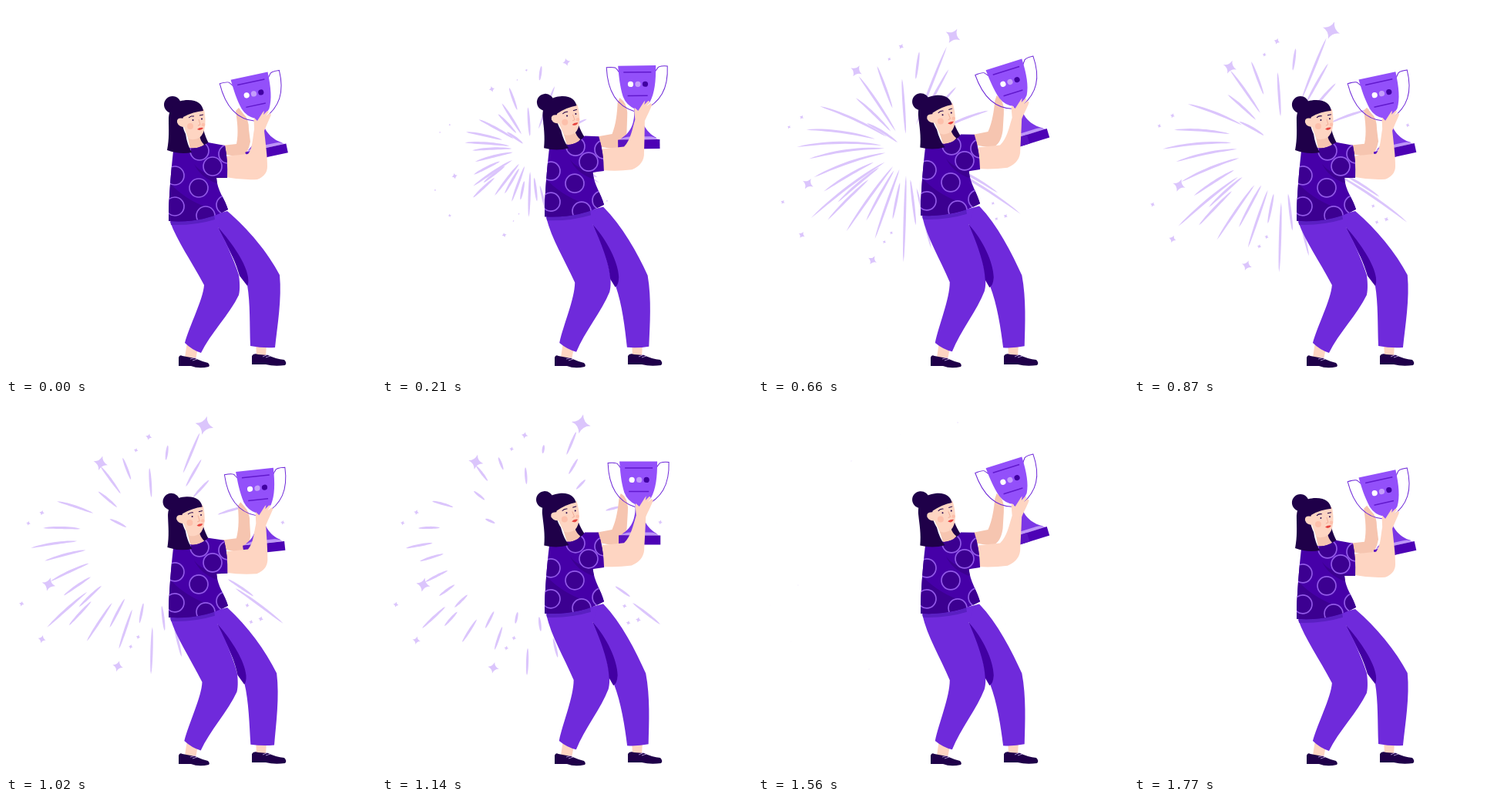
An HTML page with a canvas that plays this animation: 480x480 px, repeating every 1800 ms.

```html
<!DOCTYPE html>
<html>
<head>
<meta charset="utf-8">
<style>
html, body { margin: 0; width: 100%; height: 100%; overflow: hidden; background: #fff; }
canvas { display: block; width: 100vmin; height: 100vmin; }
</style>
</head>
<body>
<canvas width="480" height="480"></canvas>
<script>
const ctx = document.querySelector('canvas').getContext('2d');
const LOOP = 1800, BOUNCE = 900, BURST = [193, 187];
const HAIR = '#1f0049', SKIN = '#fed5c2', SKIN_FAR = '#f6c5b0', SHIRT = '#4600a8',
  SHADE = '#3c0091', PANTS = '#6f2adb', RING = '#9259e8', CUP = '#9350fa', SPARK = '#dbc5fc';

const lerp = (a, b, k) => a + (b - a) * k;
const clamp = x => Math.max(0, Math.min(1, x));
const smooth = x => { x = clamp(x); return x * x * (3 - 2 * x); };

// Each body part: colour, crouched outline, raised outline
const parts = {
  farArm: [SKIN_FAR,
    'M280,181 L299,179 C302,165 300,150 298,136 L302,132 L308,140 Q315,146 315,160 L317,176 Q314,192 306,196 Q295,195 282,192Z',
    'M275,156 L298,150 C306,138 311,125 315,112 L316,103 L319,103 Q324,112 322,124 L318,150 Q316,168 304,173 Q292,173 280,170Z'],
  nearArm: [SKIN,
    'M284,195 L314,192 C320,185 320,170 322,160 C322,152 321,146 322,145 L326,149 L333,138 L335,136 L334,141 L339,136 L341,137 L337,143 L342,139 L344,141 C340,150 337,157 335,162 C337,180 339,195 339,208 Q339,220 326,225 Q305,226 285,222Z',
    'M286,174 L314,171 C326,160 330,148 336,132 C335,124 334,118 335,116 L340,120 L347,109 L349,106 L348,112 L353,107 L355,108 L351,114 L356,110 L358,112 C355,122 350,128 348,134 C345,155 342,165 341,176 Q338,190 322,197 Q305,201 287,202Z'],
  rightLeg: [PANTS,
    'M240,278 L287,266 C315,290 340,320 355,349 C358,380 352,415 349,443 Q333,444 317,441 C316,415 317,385 313,362 C305,345 285,310 275,287Z',
    'M240,266 L287,254 C308,280 320,320 332,350 C340,380 342,412 343,440 Q332,444 319,445 C314,420 305,390 291,364 C290,345 280,310 272,280Z'],
  leftLeg: [PANTS,
    'M213,280 C222,305 240,330 257,362 C256,380 238,415 232,437 Q241,446 253,450 C265,425 290,400 302,375 C304,368 303,355 302,349 C298,335 287,310 275,287 L280,270Z',
    'M213,267 C218,300 232,325 242,355 C243,380 231,415 228,437 Q239,445 251,447 C260,420 280,390 287,366 C289,360 289,354 289,349 C290,335 284,310 272,280 L280,258Z'],
  innerLeg: ['#4200a3',
    'M275,287 C294,308 312,335 314,352 Q315,360 313,363 L303,350 C299,335 290,315 275,287Z',
    'M272,280 C290,300 300,330 299,352 Q297,365 290,367 L288,360 C290,340 285,315 272,280Z'],
  waist: ['#5a1fc2',
    'M213,277 Q255,280 270,270 L271,277 Q245,285 214,284Z',
    'M213,264 Q255,268 270,258 L271,264 Q245,272 214,271Z'],
  shirt: [SHIRT,
    'M238,184 C246,186 256,182 262,177 L284,181 Q288,200 287,223 L273,223 C274,240 284,250 288,264 Q255,282 211,279 C211,250 214,215 217,188Z',
    'M238,174 C247,176 260,168 264,158 L278,155 Q287,178 289,203 L274,207 C276,222 284,235 288,250 Q255,268 211,266 C211,240 214,205 217,180Z']
};

// Firework trails: end point and the share of the ray that stays empty
const trails = [
  [186, 82, 0], [210, 53, .6], [252, 36, 0], [254, 71, .1], [264, 98, .2],
  [151, 69, .3], [122, 80, 0], [119, 113, .1], [65, 126, 0], [134, 149, 0],
  [47, 161, .1], [31, 187, 0], [49, 204, 0], [56, 231, 0], [52, 291, 0],
  [74, 249, .2], [94, 264, .2], [81, 288, .3], [104, 309, 0], [134, 291, .1],
  [146, 319, 0], [188, 352, 0], [173, 285, .3], [228, 329, .2], [206, 295, .2],
  [361, 286, 0], [322, 250, .3], [310, 133, .2]
];
// Stars: resting place and radius
const stars = [
  [259, 24, 13], [121, 74, 10], [52, 235, 9.5], [144, 344, 7.5], [43, 308, 5.5],
  [185, 39, 4.5], [168, 57, 3], [25, 154, 3], [43, 140, 3.5], [16, 261, 3.5],
  [161, 318, 3], [171, 305, 3], [316, 263, 3], [321, 285, 3], [334, 281, 3.5], [363, 153, 3]
];
const rings = [[219, 220], [250, 236], [268, 208], [219, 260], [259, 272], [251, 188], [285, 258], [288, 192]];

function fill(path, color) {
  ctx.fillStyle = color;
  ctx.fill(new Path2D(path));
}
function stroke(path, color, width = 1) {
  ctx.strokeStyle = color;
  ctx.lineWidth = width;
  ctx.stroke(new Path2D(path));
}
function dot(x, y, r, color) {
  ctx.fillStyle = color;
  ctx.beginPath();
  ctx.arc(x, y, r, 0, 7);
  ctx.fill();
}
function place(x, y, degrees, draw) {
  ctx.save();
  ctx.translate(x, y);
  ctx.rotate(degrees * Math.PI / 180);
  draw();
  ctx.restore();
}
function blend([, low, high], k) {
  const goal = high.match(/[\d.]+/g);
  let i = 0;
  return low.replace(/[\d.]+/g, n => lerp(+n, +goal[i++], k).toFixed(2));
}

function drawTrail([x, y, start], from, to) {
  const dx = x - BURST[0], dy = y - BURST[1], len = Math.hypot(dx, dy);
  const bow = Math.abs(dx) * .24, steps = 14, left = [], right = [];
  from = lerp(start, 1, from);
  to = lerp(start, 1, to);
  if (to <= from) return;
  for (let i = 0; i <= steps; i++) {
    const s = lerp(from, to, i / steps);
    const px = BURST[0] + dx * s, py = BURST[1] + dy * s - bow * s * (1 - s);
    const w = 1.6 * Math.sqrt(Math.sin(Math.PI * i / steps) + 1e-6);
    left.push([px - dy / len * w, py + dx / len * w]);
    right.unshift([px + dy / len * w, py - dx / len * w]);
  }
  fill('M' + left.concat(right).join('L') + 'Z', SPARK);
}

function drawFirework(t) {
  const launch = .67 * Math.exp(-t / 90);
  const left = Math.max(0, 1400 - t) / 1000;
  const reach = 1 - .166 * left * left - launch;
  const head = 1 - .5 * (Math.max(0, 1150 - t) / 1000) ** 2 - launch / 2;
  const tail = .17 + .83 * smooth((t - 560) / 870);
  if (t > 0) for (const trail of trails) drawTrail(trail, tail, head);

  const size = clamp(1 - 2 * (1 - reach)) * (1 - smooth((t - 1350) / 250));
  if (size <= 0) return;
  for (const [x, y, r] of stars) {
    place(lerp(BURST[0], x, reach), lerp(BURST[1], y, reach), 10 + 220 * (1 - reach), () => {
      ctx.scale(r * size, r * size);
      fill('M0,-1 Q.18,-.18 1,0 Q.18,.18 0,1 Q-.18,.18 -1,0 Q-.18,-.18 0,-1Z', SPARK);
    });
  }
}

function drawTrophy() {
  ctx.translate(-333, -98);
  stroke('M309,82 Q307,79 306,78 Q305,75 293,76 C294,105 305,126 328,133', '#6d27d8');
  stroke('M356,82 Q358,79 359,78 Q360,74 372,75 C373,105 362,122 340,132', '#6d27d8');
  fill('M328,126 L337,126 C335,145 342,160 357,168 L311,168 C325,160 330,145 328,126Z', '#7b37e6');
  fill('M308,74 L357,74 C357,95 355,110 349,121 Q341,130 336,131 L331,147 L329,130 Q318,125 314,114 C310,100 309,88 308,74Z', CUP);
  fill('M308,170 Q316,166 322,166 L348,166 Q354,166 359,170Z', '#bd95f7');
  fill('M307,170 H361 V182 H307Z', '#4d02b5');
  fill('M307,170 H334 V182 H307Z', '#5a12c0');
  stroke('M315,82.5 H351 M320,113 H346', '#6119cd', 1.5);
  dot(324, 98, 3.6, '#fff');
  dot(333.5, 98, 3.6, '#c49dfb');
  dot(343, 98, 3.6, '#4100a2');
}

function drawNeck() {
  fill('M247,155 L256,160 Q259,171 263,178 L254,184 L246,175Z', HAIR);
  fill('M234,160 L251,168 Q252,175 257,180 Q250,188 239,186Z', SKIN_FAR);
}

function drawHead() {
  dot(216, 128, 11, HAIR);
  fill('M226,140 L257,134 C260,150 259,164 251,171 C244,174 239,174 236,171 L232,160Z', SKIN);
  fill('M211,148 C211,130 221,122 236,122 C249,122 255,128 256,136 Q243,137 230,144 C227,150 230,160 233,166 Q235,180 241,190 Q225,193 209,187 C212,172 211,160 211,148Z', HAIR);
  fill('M231,146 Q221,144 222,151 Q224,157 232,157Z', SKIN);
  dot(239, 156, 4, '#fdc0ab');
  dot(256, 154, 2.3, '#fdc0ab');
  stroke('M237,145 Q240,142 244,143 M251,142 L256,141', HAIR);
  dot(242.5, 148, 1, HAIR);
  dot(254, 146.5, 1, HAIR);
  stroke('M250,147 L252,154 L249,155', '#eda58f', .8);
  fill('M248,160 Q251,157 256,158 Q253,163 248,160Z', '#e6433f');
}

function drawShoes() {
  fill('M235,436 L249,443 L246,459 Q238,460 232,456Z M324,436 L338,438 L337,455 Q330,456 325,454Z', SKIN);
  fill('M224,456 Q225,452 229,454 L245,457 Q254,461 262,463 Q265,466 263,468 Q250,471 240,467 L224,467Z', HAIR);
  fill('M319,454 Q321,450 327,452 L340,453 Q350,458 361,459 Q365,463 362,466 Q348,468 337,465 L319,465Z', HAIR);
  stroke('M239,458 L246,456 M242,460 L248,458 M333,455 L340,452 M337,456 L343,454', '#c9b4ee', .8);
}

function drawShirt(lift) {
  const path = blend(parts.shirt, lift);
  fill(path, SHIRT);
  ctx.save();
  ctx.clip(new Path2D(path));
  ctx.translate(0, -13 * lift);
  fill('M211,228 Q230,250 262,262 L240,285 H205Z M244,205 Q256,222 290,222 L273,230 Q252,222 244,205Z', SHADE);
  for (const [x, y] of rings) {
    dot(x, y, 12, SHADE);
    ctx.strokeStyle = RING;
    ctx.lineWidth = 1.7;
    ctx.stroke();
  }
  ctx.restore();
}

function drawPerson(t) {
  const phase = t % BOUNCE / BOUNCE;
  const lift = (1 - Math.cos(2 * Math.PI * phase)) / 2;
  // Trophy sways forward on the way up and back on the way down
  const half = phase * 2 % 1;
  const sway = (phase < .5 ? 1 : -1) * smooth(1 - Math.abs(half * 2 - 1));
  const part = name => fill(blend(parts[name], lift), parts[name][0]);
  const onHead = draw => place(lerp(216, 207, lift), lerp(128, 121, lift), -11 * lift, () => {
    ctx.translate(-216, -128);
    draw();
  });

  part('farArm');
  place(lerp(321, 337, lift) + 3.3 * sway, lerp(114, 86, lift), lerp(-12, -6, lift) + 8.7 * sway, drawTrophy);
  drawShoes();
  ['rightLeg', 'leftLeg', 'innerLeg', 'waist', 'nearArm'].forEach(part);
  onHead(drawNeck);
  drawShirt(lift);
  onHead(drawHead);
}

function frame() {
  const t = performance.now() % LOOP;
  ctx.fillStyle = '#fff';
  ctx.fillRect(0, 0, 480, 480);
  drawFirework(t);
  drawPerson(t);
  requestAnimationFrame(frame);
}
frame();
</script>
</body>
</html>
```
